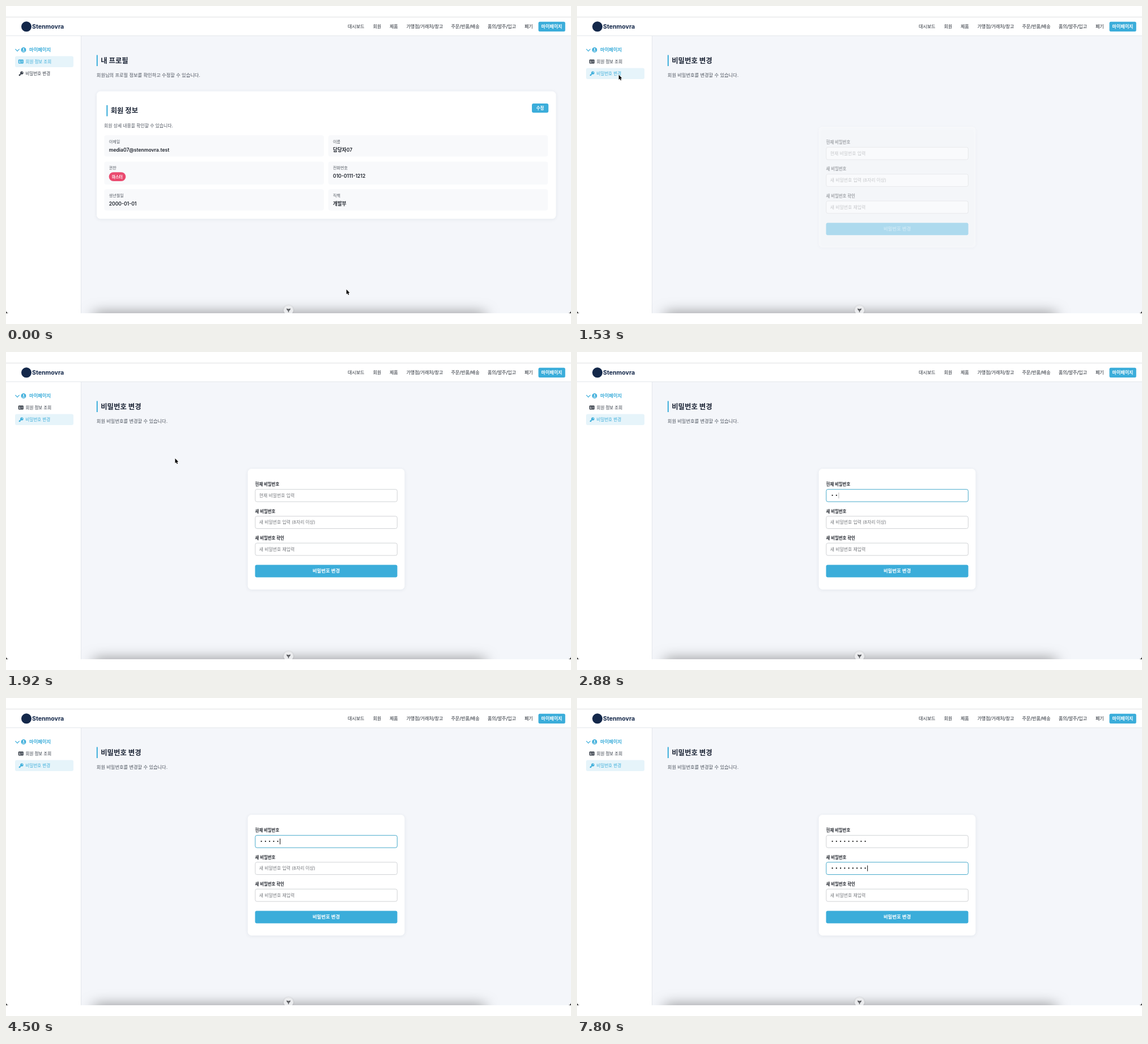
Animation, 997 px wide and 561 px high, one loop 8000 ms. Source, as an HTML page with a canvas:

```html
<!DOCTYPE html>
<html lang="ko">
<head>
<meta charset="utf-8">
<title>내 프로필</title>
<style>
  html, body { margin: 0; width: 100%; height: 100%; overflow: hidden; background: #fff; }
  canvas { display: block; width: 997px; height: 561px; }
</style>
</head>
<body>
<canvas id="stage"></canvas>
<script>
const W = 997, H = 561, LOOP = 8000;
const FONT = 'Inter, "Noto Sans CJK KR", "Noto Sans CJK", sans-serif';
const BLUE = '#3badda', INK = '#1b2435', PAGE = '#f4f6fa';

const SWITCH = 1402, FADE = 540;
const FOCUS_1 = 2190, FOCUS_2 = 5430, CARET_2 = 5970;
const KEYS_1 = [2310, 2385, 3300, 3720, 4170, 4530, 4680, 5100, 5190];
const KEYS_2 = [5880, 6150, 6210, 6270, 6330, 6600, 6750, 7650, 7740];

const canvas = document.getElementById('stage');
const ctx = canvas.getContext('2d');
const dpr = window.devicePixelRatio || 1;
canvas.width = Math.round(W * dpr);
canvas.height = Math.round(H * dpr);

const clamp = v => Math.max(0, Math.min(1, v));
const mix = (a, b, p) => a + (b - a) * p;
const smooth = p => p * p * (3 - 2 * p);

// CSS "ease": cubic-bezier(.25, .1, .25, 1)
function ease(x) {
  const bez = (a, b, s) => 3 * a * s * (1 - s) ** 2 + 3 * b * s * s * (1 - s) + s ** 3;
  let lo = 0, hi = 1;
  for (let i = 0; i < 24; i++) {
    const mid = (lo + hi) / 2;
    if (bez(.25, .25, mid) < x) lo = mid; else hi = mid;
  }
  return bez(.1, 1, (lo + hi) / 2);
}

function rect(x, y, w, h, color) {
  ctx.fillStyle = color;
  ctx.fillRect(x, y, w, h);
}

function box(x, y, w, h, r, fill, stroke, line = 0.8) {
  ctx.beginPath();
  ctx.roundRect(x, y, w, h, r);
  if (fill) { ctx.fillStyle = fill; ctx.fill(); }
  if (stroke) { ctx.strokeStyle = stroke; ctx.lineWidth = line; ctx.stroke(); }
}

function disc(x, y, r, color) {
  ctx.fillStyle = color;
  ctx.beginPath();
  ctx.arc(x, y, r, 0, Math.PI * 2);
  ctx.fill();
}

function poly(points, close) {
  ctx.beginPath();
  points.forEach(([x, y]) => ctx.lineTo(x, y));
  if (close) ctx.closePath();
}

// y is the visual middle of the line
function text(str, x, y, size, color, weight = 400, align = 'left') {
  ctx.font = `${weight} ${size}px ${FONT}`;
  ctx.textAlign = align;
  ctx.fillStyle = color;
  ctx.fillText(str, x, y + size * 0.37);
}

function card(x, y, w, h) {
  ctx.save();
  ctx.shadowColor = 'rgba(30,50,80,.08)';
  ctx.shadowBlur = 6 * dpr;
  ctx.shadowOffsetY = dpr;
  box(x, y, w, h, 6.5, '#fff');
  ctx.restore();
}

function drawHeader() {
  rect(0, 19, W, 1, '#dfe1e3');
  rect(0, 52, W, 1, '#e4e7eb');
  disc(36, 36.3, 9, '#14284a');
  text('Stenmovra', 46, 36.5, 10.6, '#14284a', 700);
  const items = [['대시보드', 603], ['회원', 647.5], ['제품', 677], ['가맹점/거래처/창고', 706.5],
    ['주문/반품/배송', 785.5], ['품의/발주/입고', 850], ['폐기', 915]];
  for (const [label, x] of items) text(label, x, 36.2, 8, '#222831', 500);
  box(939.5, 27.8, 47.3, 17.2, 2.5, BLUE);
  text('마이페이지', 963, 36.3, 8, '#fff', 700, 'center');
}

function idCard(color) {
  box(21.8, 94.4, 9, 7.2, 1.1, color);
  disc(24.4, 97.3, 1, '#fff');
  rect(23, 98.9, 2.8, 1.1, '#fff');
  rect(27, 96.6, 2.6, 0.8, '#fff');
  rect(27, 98.6, 2.6, 0.8, '#fff');
}

function keyIcon(color) {
  ctx.strokeStyle = color;
  ctx.lineWidth = 1.9;
  poly([[27.4, 118.6], [22.8, 122.6]]);
  ctx.stroke();
  rect(23.6, 121.4, 1.7, 1.7, color);
  disc(27.9, 117.9, 2.7, color);
  disc(28.6, 117.2, 0.75, '#fff');
}

function drawSidebar(active) {
  rect(132, 53, 1, 489, '#e3e6eb');
  ctx.strokeStyle = BLUE;
  ctx.lineWidth = 1.2;
  poly([[16.4, 75.8], [20, 79.6], [23.6, 75.8]]);
  ctx.stroke();
  disc(31, 77.4, 4.4, BLUE);
  disc(31, 76.1, 1.4, '#fff');
  ctx.beginPath();
  ctx.ellipse(31, 80, 2.5, 1.6, 0, Math.PI, 0);
  ctx.fill();
  text('마이페이지', 41, 77.2, 8.3, BLUE, 700);

  box(16, active ? 109.6 : 88.5, 103, 19.4, 3, '#e6f4fa');
  const tint = i => i === active ? BLUE : '#333a45';
  idCard(tint(0));
  keyIcon(tint(1));
  text('회원 정보 조회', 34.5, 98, 7.55, tint(0), 500);
  text('비밀번호 변경', 34.5, 119.4, 7.55, tint(1), 500);
}

function drawTitle(title, note) {
  rect(159.8, 86.5, 2, 19.5, BLUE);
  text(title, 167.2, 96.5, 12.4, INK, 700);
  text(note, 159.8, 121.6, 8.24, '#4c535e');
}

function drawProfile() {
  drawTitle('내 프로필', '회원님의 프로필 정보를 확인하고 수정할 수 있습니다.');
  card(160, 150.5, 810.5, 225);
  rect(177.3, 175, 2.1, 19.5, BLUE);
  text('회원 정보', 184.8, 184.7, 12.3, INK, 700);
  box(928, 172, 29.2, 16.3, 3, BLUE);
  text('수정', 942.6, 180.2, 7.5, '#fff', 700, 'center');
  text('회원 상세 내용을 확인할 수 있습니다.', 173, 211.5, 7.87, '#4c535e');

  const rows = [
    [228, 37.5, 239, '이메일', 'media07@stenmovra.test', '이름', '담당자07'],
    [274.6, 40.4, 285.6, '권한', '', '전화번호', '010-0111-1212'],
    [323.2, 37.6, 334, '생년월일', '2000-01-01', '직책', '개발부'],
  ];
  for (const [y, h, mid, nameL, valueL, nameR, valueR] of rows) {
    [[173.3, nameL, valueL], [568.7, nameR, valueR]].forEach(([x, name, value]) => {
      box(x, y, 387.6, h, 4, '#f8f9fb');
      text(name, x + 8.4, mid, 7.05, '#555b64');
      text(value, x + 8.4, mid + 14.5, 8.55, '#1d222b', 600);
    });
  }
  box(181.6, 293.2, 29.7, 15.8, 7.9, '#ea4a6f');
  text('마스터', 196.4, 301.1, 6.85, '#fff', 700, 'center');
}

const typed = (keys, t) => keys.filter(k => k <= t).length;

function caretAlpha(since) {
  const s = since % 1050;
  if (s < 390) return 1;
  if (s < 540) return 1 - (s - 390) / 150;
  return s < 900 ? 0 : (s - 900) / 150;
}

function field(y, label, hint, keys, focus, t, caretFrom) {
  text(label, 439.6, y - 8.6, 7.42, '#22262e', 700);
  const tone = (a, b) => Math.round(mix(a, b, focus));
  box(439.8, y + 0.3, 250.5, 21.8, 3, '#fff', `rgb(${tone(198, 72)},${tone(200, 170)},${tone(204, 203)})`, mix(0.8, 1, focus));
  const n = typed(keys, t);
  if (!n) text(hint, 446.8, y + 11, 7.88, '#74777c');
  for (let i = 0; i < n; i++) disc(450.6 + i * 7.25, y + 10.8, 1.15, '#111');
  if (focus > 0 && t >= caretFrom) {
    const last = Math.max(caretFrom, n ? keys[n - 1] : 0);
    ctx.save();
    ctx.globalAlpha *= caretAlpha(t - last);
    rect(446.9 + n * 7.25, y + 6, 1, 10.2, '#111');
    ctx.restore();
  }
}

function drawPassword(t) {
  drawTitle('비밀번호 변경', '회원 비밀번호를 변경할 수 있습니다.');
  const p = ease(clamp((t - SWITCH) / FADE));
  const focus2 = clamp((t - FOCUS_2) / 150);
  const focus1 = clamp((t - FOCUS_1) / 150) * (1 - focus2);
  ctx.save();
  ctx.globalAlpha = p;
  ctx.translate(0, 11.2 * (1 - p));
  card(426.6, 206, 276.8, 213);
  field(242, '현재 비밀번호', '현재 비밀번호 입력', KEYS_1, focus1, t, FOCUS_1);
  field(289.4, '새 비밀번호', '새 비밀번호 입력 (8자리 이상)', KEYS_2, focus2, t, CARET_2);
  field(336.8, '새 비밀번호 확인', '새 비밀번호 재입력', [], 0, t, LOOP);
  box(439.5, 375.5, 251, 21.9, 3, BLUE);
  text('비밀번호 변경', 565, 386.3, 8.38, '#fff', 700, 'center');
  ctx.restore();
}

function drawWindowEdge() {
  ctx.save();
  ctx.beginPath();
  ctx.rect(0, 500, W, 42);
  ctx.clip();
  ctx.shadowColor = 'rgba(0,0,0,.5)';
  ctx.shadowBlur = 24 * dpr;
  rect(155, 543, 690, 18, '#000');
  ctx.shadowBlur = 3 * dpr;
  ctx.shadowColor = 'rgba(0,0,0,.15)';
  disc(498.5, 536.5, 8.6, '#ebecee');
  ctx.shadowColor = 'transparent';
  ctx.fillStyle = '#5c5e62';
  poly([[494.8, 533.4], [498.5, 534.6], [502.2, 533.4], [501.2, 536.6], [499.3, 537.8],
    [499.2, 540.2], [497.8, 540.2], [497.7, 537.8], [495.8, 536.6]], true);
  ctx.fill();
  ctx.fillStyle = '#111';
  for (const [x, dir] of [[0, 1], [W, -1]]) {
    ctx.beginPath();
    ctx.moveTo(x, 537.5);
    ctx.quadraticCurveTo(x + dir * 0.4, 541.6, x + dir * 4.5, 542);
    ctx.lineTo(x, 542);
    ctx.fill();
  }
  ctx.restore();
}

function drawPointer(t) {
  if (t >= KEYS_1[0]) return;
  const go = smooth(clamp((t - 450) / 780));
  const back = smooth(clamp((t - 1710) / 420));
  const x = mix(mix(600.7, 73.7, go), 520, back);
  const y = mix(mix(500, 121.5, go), 253, back);
  ctx.save();
  ctx.translate(x, y);
  poly([[0, 0], [0, 8.4], [1.9, 6.7], [3.2, 9.7], [4.6, 9.1], [3.3, 6.2], [5.7, 6]], true);
  ctx.lineJoin = 'round';
  ctx.strokeStyle = '#fff';
  ctx.lineWidth = 1.1;
  ctx.stroke();
  ctx.fillStyle = '#000';
  ctx.fill();
  ctx.restore();
}

function draw(t) {
  ctx.setTransform(dpr, 0, 0, dpr, 0, 0);
  rect(0, 0, W, H, '#fff');
  rect(133, 53, W - 133, 489, PAGE);
  const changed = t >= SWITCH;
  drawHeader();
  drawSidebar(changed ? 1 : 0);
  if (changed) drawPassword(t); else drawProfile();
  drawWindowEdge();
  drawPointer(t);
}

const start = performance.now();
function tick() {
  draw((performance.now() - start) % LOOP);
  requestAnimationFrame(tick);
}
tick();
</script>
</body>
</html>
```
